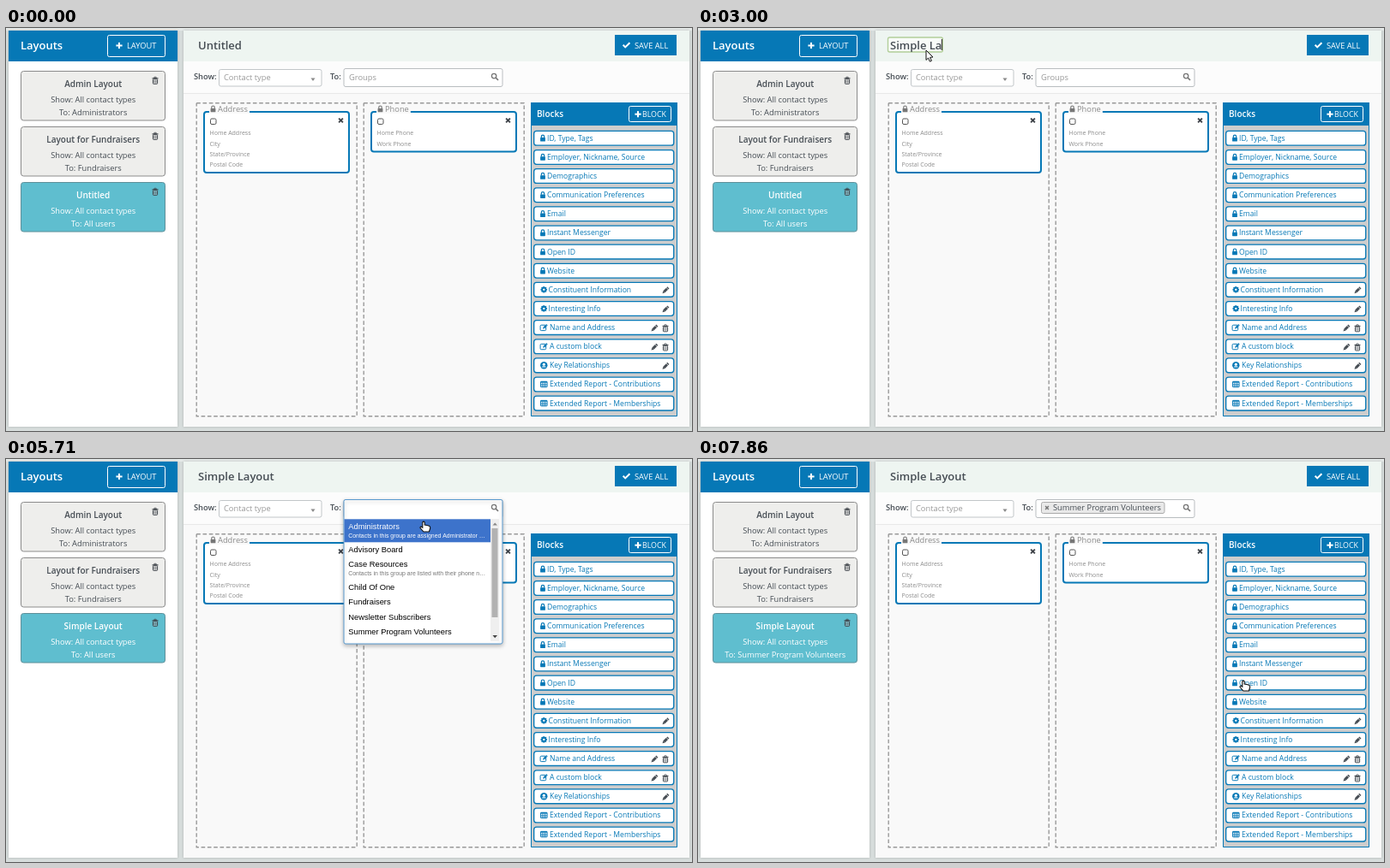
An HTML page with a canvas for the animation above (8000 ms loop, 800 px wide and 471 px high).

```html
<!DOCTYPE html>
<html lang="en">
<head>
<meta charset="utf-8">
<title>Layout editor</title>
<style>
html, body { margin: 0; width: 100%; height: 100%; overflow: hidden; background: #d7dddc; }
canvas { display: block; }
</style>
</head>
<body>
<canvas id="stage" width="800" height="471"></canvas>
<script>
const ctx = document.getElementById('stage').getContext('2d');
const LOOP = 8000;
const BLUE = '#0678b6', DARK = '#464d54', MUTED = '#8c8c8c', BODY = '#f9f9f9';
const SANS = '"Open Sans", sans-serif', ARIAL = '"Liberation Sans", Arial, sans-serif';

// Stepped timelines: each entry holds until the next one.
const cursorSteps = [
  [0, 'none', 0, 0], [430, 'arrow', 291, 3], [570, 'hand', 277, 14], [710, 'hand', 269, 22],
  [860, 'hand', 266, 25], [1860, 'arrow', 266, 26], [3710, 'hand', 266, 25],
  [4570, 'arrow', 302, 42], [4710, 'arrow', 372, 64], [4860, 'beam', 452, 60],
  [5140, 'beam', 487, 51], [5570, 'beam', 488, 58], [5710, 'hand', 487, 73],
  [5860, 'hand', 481, 84], [6140, 'hand', 473, 105], [6290, 'hand', 465, 127],
  [6430, 'hand', 457, 149], [6570, 'hand', 450, 175], [6710, 'hand', 448, 200],
  [7140, 'arrow', 448, 200], [7290, 'arrow', 472, 220], [7430, 'arrow', 524, 252],
  [7570, 'arrow', 584, 273], [7710, 'hand', 626, 276], [7860, 'hand', 636, 259]
];
const titleSteps = [
  [0, 'Untitled', 'plain'], [570, 'Untitled', 'hover'], [1430, 'Untitled', 'edit'],
  [1860, 'S', 'edit'], [2140, 'Sim', 'edit'], [2290, 'Simp', 'edit'], [2570, 'Simpl', 'edit'],
  [2710, 'Simple', 'edit'], [2860, 'Simple L', 'edit'], [3000, 'Simple La', 'edit'],
  [3140, 'Simple Lay', 'edit'], [3290, 'Simple Layo', 'edit'], [3430, 'Simple Layou', 'edit'],
  [3570, 'Simple Layout', 'edit'], [3710, 'Simple Layout', 'hover'], [4570, 'Simple Layout', 'plain']
];
const groupSteps = [
  [0, 'idle'], [5140, 'focus'], [5430, 'open', 0], [6140, 'open', 1], [6430, 'open', 2],
  [6570, 'open', 4], [6710, 'open', 5], [7000, 'open', 6], [7140, 'chosen']
];
const groups = [
  ['Administrators', 'Contacts in this group are assigned Administrator …'],
  ['Advisory Board'],
  ['Case Resources', 'Contacts in this group are listed with their phone n…'],
  ['Child Of One'], ['Fundraisers'], ['Newsletter Subscribers'], ['Summer Program Volunteers']
];
const blocks = [
  ['lock', 'ID, Type, Tags'], ['lock', 'Employer, Nickname, Source'], ['lock', 'Demographics'],
  ['lock', 'Communication Preferences'], ['lock', 'Email'], ['lock', 'Instant Messenger'],
  ['lock', 'Open ID'], ['lock', 'Website'],
  ['gear', 'Constituent Information', 'pencil'], ['gear', 'Interesting Info', 'pencil'],
  ['edit', 'Name and Address', 'both'], ['edit', 'A custom block', 'both'],
  ['person', 'Key Relationships', 'pencil'],
  ['table', 'Extended Report - Contributions'], ['table', 'Extended Report - Memberships']
];

const stepAt = (steps, t) => steps.filter(s => s[0] <= t).pop().slice(1);

function rect(x, y, w, h, fill) {
  ctx.fillStyle = fill;
  ctx.fillRect(x, y, w, h);
}

function box(x, y, w, h, r, fill, stroke, line = 1) {
  ctx.beginPath();
  ctx.roundRect(x, y, w, h, r);
  if (fill) { ctx.fillStyle = fill; ctx.fill(); }
  if (stroke) { ctx.strokeStyle = stroke; ctx.lineWidth = line; ctx.stroke(); }
}

// The y of a text is the middle of its capitals.
function text(s, x, y, size, color, { weight = 400, align = 'left', family = SANS } = {}) {
  ctx.font = `${weight} ${size}px ${family}`;
  ctx.textAlign = align;
  ctx.fillStyle = color;
  ctx.fillText(s, x, y + size * 0.357);
  return ctx.measureText(s).width;
}

function lines(points, color, width, close) {
  ctx.beginPath();
  points.forEach(([x, y]) => ctx.lineTo(x, y));
  if (close) ctx.closePath();
  ctx.strokeStyle = color;
  ctx.lineWidth = width;
  ctx.stroke();
}

function polygon(points, fill) {
  ctx.beginPath();
  points.forEach(([x, y]) => ctx.lineTo(x, y));
  ctx.closePath();
  ctx.fillStyle = fill;
  ctx.fill();
}

function disc(x, y, r, fill) {
  ctx.beginPath();
  ctx.arc(x, y, r, 0, 7);
  ctx.fillStyle = fill;
  ctx.fill();
}

function ring(x, y, r, color, width) {
  ctx.beginPath();
  ctx.arc(x, y, r, 0, 7);
  ctx.strokeStyle = color;
  ctx.lineWidth = width;
  ctx.stroke();
}

function at(x, y, draw) {
  ctx.save();
  ctx.translate(x, y);
  draw();
  ctx.restore();
}

// Icons are centred on the given point.
const icons = {
  lock(c) {
    box(-2.9, -0.6, 5.8, 4.4, 0.6, c);
    ctx.beginPath();
    ctx.arc(0, -1.8, 1.7, Math.PI, 0);
    ctx.lineTo(1.7, -0.4);
    ctx.moveTo(-1.7, -1.8);
    ctx.lineTo(-1.7, -0.4);
    ctx.strokeStyle = c;
    ctx.lineWidth = 1.2;
    ctx.stroke();
  },
  trash(c) {
    rect(-3.5, -3.2, 7, 1.1, c);
    box(-1.3, -4.2, 2.6, 1.4, 0.4, null, c, 0.8);
    box(-2.6, -1.8, 5.2, 5.6, 0.7, '#ffffff55', c, 1);
    for (const x of [-1, 0.9]) lines([[x, -0.8], [x, 2.8]], c, 0.8);
  },
  pencil(c) {
    ctx.rotate(Math.PI / 4);
    rect(-1.5, -4.8, 3, 1.5, c);
    rect(-1.5, -2.8, 3, 5, c);
    polygon([[-1.5, 2.2], [1.5, 2.2], [0, 4.9]], c);
  },
  gear(c) {
    for (let i = 0; i < 8; i++) {
      ctx.rotate(Math.PI / 4);
      rect(-0.85, -3.8, 1.7, 2, c);
    }
    ring(0, 0, 2.1, c, 1.8);
  },
  edit(c) {
    box(-4.2, -2.8, 6.6, 6.4, 1.2, null, c, 1);
    ctx.translate(1.2, -0.8);
    ctx.scale(0.72, 0.72);
    icons.pencil(c);
  },
  person(c) {
    disc(0, 0, 4.2, c);
    disc(0, -1.1, 1.6, '#fff');
    ctx.beginPath();
    ctx.ellipse(0, 2.3, 2.6, 1.4, 0, Math.PI, 0);
    ctx.fillStyle = '#fff';
    ctx.fill();
  },
  table(c) {
    box(-3.8, -3.2, 7.6, 6.6, 0.7, null, c, 0.9);
    rect(-3.8, -3.4, 7.6, 1.6, c);
    for (const x of [-1.3, 1.3]) lines([[x, -2], [x, 3.2]], c, 0.8);
    for (const y of [0, 1.8]) lines([[-3.8, y], [3.8, y]], c, 0.8);
  },
  plus(c) {
    rect(-3.6, -1, 7.2, 2, c);
    rect(-1, -3.6, 2, 7.2, c);
  },
  check(c) {
    lines([[-3.9, -0.2], [-1.3, 2.4], [3.9, -2.8]], c, 2);
  },
  cross(c) {
    lines([[-2.4, -2.4], [2.4, 2.4]], c, 1.9);
    lines([[2.4, -2.4], [-2.4, 2.4]], c, 1.9);
  },
  search(c) {
    ring(-0.9, -0.9, 2.7, c, 1.3);
    lines([[1.2, 1.2], [4, 4]], c, 1.7);
  }
};
const icon = (name, x, y, color) => at(x, y, () => icons[name](color));

const cursors = {
  none() {},
  arrow() {
    const shape = [[0, 0], [0, 11.4], [2.6, 9], [4.4, 13.2], [6.4, 12.3], [4.6, 8.3], [8, 8]];
    polygon(shape, '#fff');
    lines(shape, '#111', 1, true);
  },
  hand() {
    const hand = new Path2D('M-1.2 .8Q0-.6 1.2.8V4L4 4.5 6.6 5.3Q8 6 7.7 8L6.4 12H0L-4 7.6Q-3.9 5.6-2.5 6.2L-1.2 7.2Z');
    ctx.fillStyle = '#fff';
    ctx.fill(hand);
    ctx.strokeStyle = '#111';
    ctx.lineWidth = 1.1;
    ctx.stroke(hand);
  },
  beam() {
    lines([[0, -5], [0, 5]], '#222', 1.5);
    for (const y of [-5.4, 5.4]) lines([[-2.5, y], [2.5, y]], '#222', 1.2);
  }
};

function panel(x, y, w, h, fill) {
  ctx.save();
  ctx.shadowColor = '#0003';
  ctx.shadowBlur = 3;
  rect(x, y, w, h, fill);
  ctx.restore();
}

function card(y, title, target, active) {
  const color = active ? '#fff' : DARK;
  box(17.5, y + 0.5, 168, 57.5, 3, active ? '#5fbecf' : '#eeeeec', active ? '#5f8f99' : '#8b8b8b');
  text(title, 101.7, y + 15, 10, color, { weight: 600, align: 'center' });
  text('Show: All contact types', 101.7, y + 34, 9.3, color, { align: 'center' });
  text('To: ' + target, 101.7, y + 48.4, 9.3, color, { align: 'center' });
  icon('trash', 174, y + 11.5, '#3d4248');
}

function drawSidebar(name, target) {
  panel(3, 3, 197, 463, '#fff');
  rect(3, 3, 197, 36, BLUE);
  text('Layouts', 17, 20.5, 13, '#fff', { weight: 600 });
  box(118.5, 8.5, 67, 25, 2, null, '#fff');
  icon('plus', 132, 20.5, '#fff');
  text('LAYOUT', 141, 20.7, 9.3, '#fff');
  card(50, 'Admin Layout', 'Administrators');
  card(115, 'Layout for Fundraisers', 'Fundraisers');
  card(180, name, target, true);
}

function drawTitle(title, mode) {
  ctx.font = `600 13px ${SANS}`;
  const end = 224 + ctx.measureText(title).width;
  if (mode === 'hover') {
    box(221.5, 11.5, end + 20 - 221.5, 16, 2, null, '#c6cfca');
    rect(end + 1, 12, 18.5, 15, '#e3e9e6');
    icon('pencil', end + 10, 18.5, DARK);
  }
  if (mode === 'edit') {
    box(221.5, 11, end + 1 - 221.5, 17, 2, '#f8fbf8', '#b3cf9a', 1.4);
    rect(end - 0.5, 13, 1, 13, '#222');
  }
  text(title, 224, 20, 13, DARK, { weight: 600 });
}

function drawToolbar(state) {
  text('Show:', 219, 57, 9.3, DARK, { weight: 600 });
  box(248.5, 48.5, 119.5, 19.5, 2, '#fff', '#c2c6c9');
  text('Contact type', 254, 58, 9.3, '#9a9a9a');
  polygon([[355.5, 58.5], [360.5, 58.5], [358, 62]], '#8a8a8a');
  text('To:', 378, 57, 9.3, DARK, { weight: 600 });

  const focused = state === 'focus';
  ctx.save();
  if (focused) { ctx.shadowColor = '#66afe9'; ctx.shadowBlur = 4; }
  box(394, 47.5, 185, 21, 2, '#fff', focused ? '#7b8d9c' : '#b9bdc0');
  ctx.restore();
  if (state === 'idle') text('Groups', 400, 58, 9.3, '#9a9a9a');
  if (focused) rect(400, 52, 1, 12, '#222');
  if (state === 'chosen') {
    box(400.5, 50.5, 143.5, 13, 2, '#e9e9e9', '#aaa');
    at(407, 57, () => { ctx.scale(0.8, 0.8); icons.cross('#777'); });
    text('Summer Program Volunteers', 414, 57, 9.3, DARK);
  }
  icon('search', 570, 57, '#777');
}

function fieldBlock(x, w, h, title, fields) {
  box(x + 1, 98, w - 2, h - 2, 3, '#fff', BLUE, 2);
  ctx.font = `9.3px ${SANS}`;
  rect(x + 7, 90, ctx.measureText(title).width + 12, 10, BODY);
  icon('lock', x + 11.5, 94.5, '#777');
  text(title, x + 17, 95, 9.3, MUTED);
  box(x + 8.5, 106, 6.5, 6.5, 1.5, '#fff', '#555');
  icon('cross', x + w - 10.5, 108, '#3d4248');
  fields.forEach((f, i) => text(f, x + 7.5, 123 + i * 12.1, 7, MUTED));
}

function drawColumns() {
  ctx.setLineDash([4.6, 2.7]);
  for (const x of [222, 417]) {
    box(x + 0.2, 87.7, 187, 366, 0, null, '#999', 1.4);
  }
  ctx.setLineDash([]);
  fieldBlock(230, 171, 73, 'Address', ['Home Address', 'City', 'State/Province', 'Postal Code']);
  fieldBlock(425, 171, 48.5, 'Phone', ['Home Phone', 'Work Phone']);
}

function drawBlocks() {
  rect(612, 87, 171, 367, '#cdcdcd');
  box(612.5, 87.5, 170, 366, 0, null, BLUE);
  rect(612, 87, 171, 27, BLUE);
  text('Blocks', 619, 100.7, 10, '#fff', { weight: 600 });
  box(726.5, 91.5, 49, 18, 2, null, '#fff');
  icon('plus', 737, 100.7, '#fff');
  text('BLOCK', 742, 100.8, 8.8, '#fff');

  blocks.forEach(([kind, label, tools], i) => {
    const y = 128.7 + i * 22.13;
    const locked = kind === 'lock';
    box(615.7, y - 8.3, 163, 16.8, 3, '#fff', BLUE, 1.3);
    icon(kind, locked ? 626 : 627.3, y, BLUE);
    text(label, locked ? 631 : kind === 'gear' ? 632.5 : 634, y, 8.6, BLUE);
    if (tools) icon('pencil', tools === 'both' ? 756 : 769, y + 1, DARK);
    if (tools === 'both') icon('trash', 769, y + 1, DARK);
  });
}

function drawDropdown(active) {
  ctx.save();
  ctx.shadowColor = '#0004';
  ctx.shadowBlur = 5;
  ctx.shadowOffsetY = 2;
  box(394, 47.5, 185, 168.5, 2, '#fff', '#5b9bd0');
  ctx.restore();
  icon('search', 570, 57, '#777');

  let top = 70.3;
  groups.forEach(([name, note], i) => {
    const height = note ? 27 : 17.1;
    const on = i === active;
    if (on) rect(394.5, top, 170.5, height, '#3d73cb');
    text(name, 399.3, top + 8.6, 9.35, on ? '#fff' : '#000', { family: ARIAL });
    if (note) text(note, 399.3, top + 19.6, 6.9, on ? '#fff' : '#777', { family: ARIAL });
    top += height;
  });

  rect(565, 70, 10, 143, '#efefef');
  rect(566.5, 81, 7, 104, '#b2b2b2');
  polygon([[567.5, 77.5], [573, 77.5], [570.2, 74.5]], '#888');
  polygon([[567.5, 206], [573, 206], [570.2, 209.3]], '#444');
}

function draw(t) {
  const [title, mode] = stepAt(titleSteps, t);
  const [state, active] = stepAt(groupSteps, t);
  const [pointer, px, py] = stepAt(cursorSteps, t);

  rect(0, 0, 800, 471, '#d7dddc');
  rect(0, 0, 800, 3, '#e6eae9');
  drawSidebar(t < 3710 ? 'Untitled' : 'Simple Layout',
    state === 'chosen' ? 'Summer Program Volunteers' : 'All users');

  panel(207, 3, 590, 463, BODY);
  rect(207, 3, 590, 36, '#eef5f1');
  rect(207, 39, 590, 37, '#fcfcfc');
  rect(207, 76, 590, 1, '#e9e9e9');
  drawTitle(title, mode);
  rect(710, 8, 72, 24, BLUE);
  icon('check', 723.5, 20, '#fff');
  text('SAVE ALL', 733, 20.3, 9.3, '#fff');

  drawToolbar(state);
  drawColumns();
  drawBlocks();
  if (state === 'open') drawDropdown(active);
  at(px, py, cursors[pointer]);
}

function tick() {
  draw(performance.now() % LOOP);
  requestAnimationFrame(tick);
}
tick();
</script>
</body>
</html>
```
